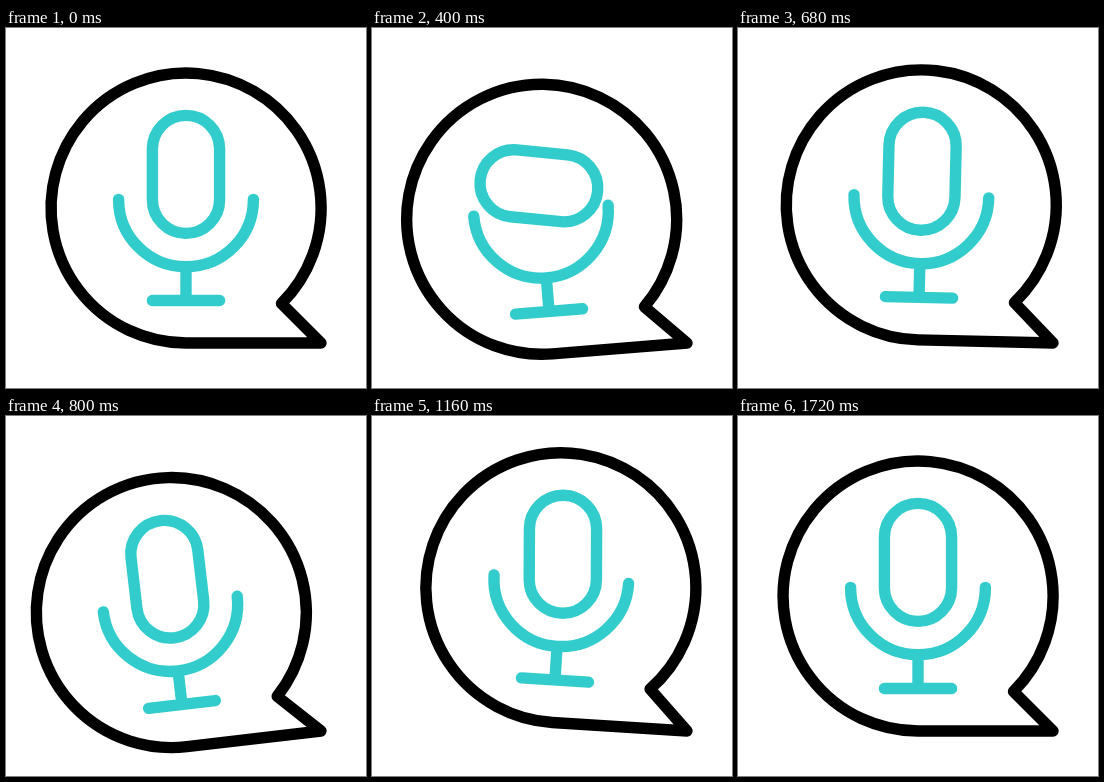
Animation of 360x360 px, one loop 2 s. Source, as an HTML page:

```html
<!DOCTYPE html>
<html lang="en">
<head>
<meta charset="utf-8">
<title>Voice message</title>
<style>
  html, body { margin: 0; height: 100%; overflow: hidden; background: #fff; }
  svg { display: block; width: 100%; height: 100%; fill: none; stroke-width: 11.4; stroke-linecap: round; stroke-linejoin: round; }
</style>
</head>
<body>
<svg viewBox="0 0 360 360">
  <g id="bubble">
    <path stroke="#000" d="M315 315H180A135 135 0 1 1 275.5 275.5Z"/>
    <g stroke="#33cccc">
      <rect id="head" x="146.4" y="87.4" width="67.2" height="118" rx="33.6"/>
      <path d="M112.6 171.4a67.4 67.4 0 0 0 134.8 0M180 238.8V272.5M146.4 272.5H213.6"/>
    </g>
  </g>
</svg>
<script>
const LOOP = 2000;
// Keyframes: [time in ms, angle in degrees]
const swing = [[50, 0], [312, -10], [557, 8], [825, -7], [1203, 4], [1700, 0]];
const spin = [[216, 0], [560, 180], [845, 180], [1189, 360]];

const bubble = document.getElementById('bubble');
const head = document.getElementById('head');
const smooth = p => p * p * (3 - 2 * p);

function angleAt(keys, t) {
  const next = keys.findIndex(([time]) => time > t);
  if (next === 0) return keys[0][1];
  if (next < 0) return keys[keys.length - 1][1];
  const [t0, a0] = keys[next - 1], [t1, a1] = keys[next];
  return a0 + (a1 - a0) * smooth((t - t0) / (t1 - t0));
}

function draw() {
  const t = performance.now() % LOOP;
  bubble.setAttribute('transform', `rotate(${angleAt(swing, t)} 315 315)`);
  head.setAttribute('transform', `rotate(${angleAt(spin, t)} 180 146.4)`);
  requestAnimationFrame(draw);
}
draw();
</script>
</body>
</html>
```
